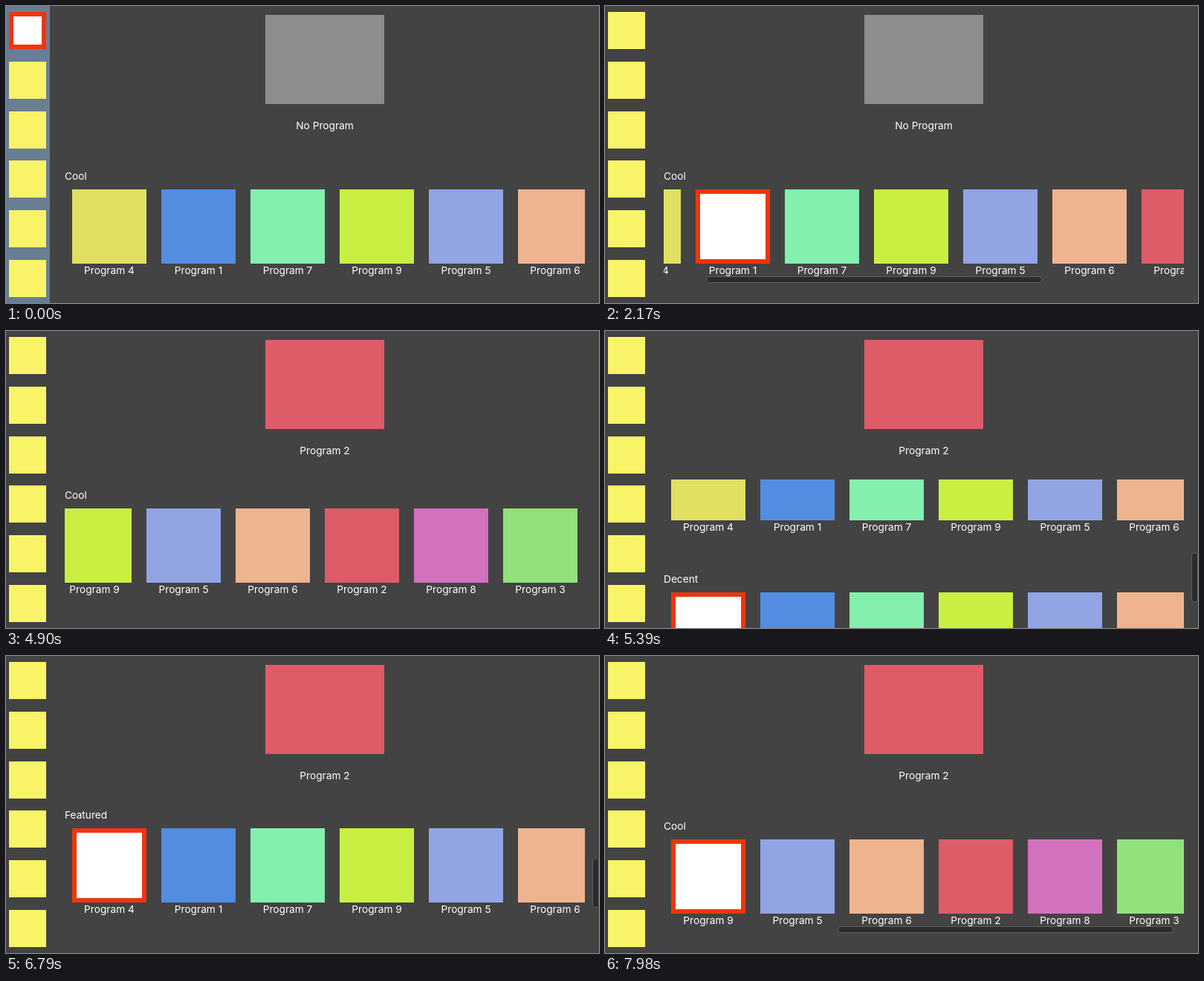
Write an HTML page with a canvas that moves like this. It is 798 by 400 pixels and loops after 8 s.

```html
<!DOCTYPE html>
<html lang="en">
<head>
<meta charset="utf-8">
<title>Program browser</title>
<style>
  html, body { margin: 0; width: 100%; height: 100%; overflow: hidden; background: #434343; }
  canvas { display: block; }
</style>
</head>
<body>
<canvas id="stage" width="798" height="400"></canvas>
<script>
const ctx = document.getElementById('stage').getContext('2d');
const LOOP = 8000, STEP = 70;

const BG = '#434343', RING = '#f0350e', YELLOW = '#f9f368';
const PROGRAMS = [
  [4, '#e1e063'], [1, '#528de2'], [7, '#83f0ae'],
  [9, '#c9ef42'], [5, '#91a5e4'], [6, '#eeb490'],
  [2, '#dd5c68'], [8, '#d271bd'], [3, '#92e17b']
].map(([id, color]) => ({ name: 'Program ' + id, color }));
const ROWS = ['Cool', 'Featured', 'Decent'];

const VIEW = { x: 79, y: 200, w: 700, h: 200 };
const PITCH = 120, ROW_H = 197;
const CONTENT_W = 1080, CONTENT_H = 588;
const MAX_X = CONTENT_W - VIEW.w, MAX_Y = CONTENT_H - VIEW.h;

// Focus moves: time, row (-1 is the menu), item.
const MENU = -1;
const MOVES = [
  [0, MENU, 0], [70, MENU, 1], [350, MENU, 2], [630, MENU, 3],
  [980, MENU, 2], [1260, MENU, 1],
  [1610, 0, 0], [1960, 0, 1], [2300, 0, 2], [2640, 0, 3], [2960, 0, 4],
  [3320, 0, 5], [3640, 0, 6],
  [4841, 1, 0], [5160, 2, 0], [5605, 2, 1], [5960, 2, 2],
  [6457, 1, 0], [6800, 0, 6], [7300, 0, 5], [7550, 0, 4], [7800, 0, 3]
].map(([at, row, item]) => ({ at, row, item }));
const SELECT = { at: 4200, program: PROGRAMS[6] };

// cubic-bezier(.42, 0, .58, 1)
function ease(x) {
  if (x <= 0) return 0;
  if (x >= 1) return 1;
  let lo = 0, hi = 1;
  for (let i = 0; i < 24; i++) {
    const u = (lo + hi) / 2, v = 1 - u;
    if (3 * v * v * u * 0.42 + 3 * v * u * u * 0.58 + u * u * u < x) lo = u;
    else hi = u;
  }
  return lo * lo * (3 - 2 * lo);
}

// Smooth scrolling: each new target starts from wherever the last one got to.
function makeScroll(moves, target, linger) {
  const runs = [];
  const valueOf = (run, t) => run.from + (run.to - run.from) * ease((t - run.at) / run.time);
  let to = 0;
  for (const move of moves) {
    const next = target(move);
    if (next === to) continue;
    const last = runs[runs.length - 1];
    const from = last ? valueOf(last, move.at) : 0;
    runs.push({ at: move.at, from, to: next, time: 30 * Math.sqrt(Math.abs(next - from)) });
    to = next;
  }
  return {
    at(t) {
      const run = runs.filter(r => r.at <= t).pop();
      return run ? valueOf(run, t) : 0;
    },
    barShown: t => runs.some(r => t > r.at + 65 && t < r.at + r.time + linger)
  };
}

const inRows = MOVES.filter(m => m.row !== MENU);
const scrollY = makeScroll(inRows, m => Math.min(m.row * ROW_H, MAX_Y), 40);
const scrollX = ROWS.map((_, row) =>
  makeScroll(inRows.filter(m => m.row === row), m => Math.min(m.item * PITCH, MAX_X), 300));

function rect(x, y, w, h, color) {
  ctx.fillStyle = color;
  ctx.fillRect(x, y, w, h);
}

function tile(x, y, size, color, focused) {
  rect(x, y, size, size, focused ? RING : color);
  if (focused) rect(x + 6, y + 6, size - 12, size - 12, '#fff');
}

function label(text, x, y, align = 'center') {
  ctx.font = '13.7px Inter, "Liberation Sans", sans-serif';
  ctx.textAlign = align;
  ctx.fillStyle = '#fff';
  ctx.fillText(text, x, y);
}

function bar(x, y, w, h) {
  ctx.beginPath();
  ctx.roundRect(x + 0.5, y + 0.5, w - 1, h - 1, 3.5);
  ctx.fillStyle = '#2b2b2b';
  ctx.fill();
  ctx.strokeStyle = '#606060';
  ctx.lineWidth = 1;
  ctx.stroke();
}

function clipped(x, y, w, h, paint) {
  ctx.save();
  ctx.beginPath();
  ctx.rect(x, y, w, h);
  ctx.clip();
  paint();
  ctx.restore();
}

function drawMenu(focus) {
  const active = focus.row === MENU;
  if (active) rect(0, 0, 59, 400, '#697e94');
  for (let i = 0; i < 6; i++) {
    tile(4, Math.round(8 + i * 66.8), 50, YELLOW, active && focus.item === i);
  }
}

function drawPreview(program) {
  rect(349, 12, 160, 120, program ? program.color : '#8d8d8d');
  label(program ? program.name : 'No Program', 429, 166);
}

function drawRow(row, t, focus, top) {
  const shift = Math.round(scrollX[row].at(t));
  label(ROWS[row], VIEW.x, top + 34, 'left');
  PROGRAMS.forEach((program, i) => {
    const x = 89 + i * PITCH - shift;
    tile(x, top + 47, 100, program.color, focus.row === row && focus.item === i);
    label(program.name, x + 50, top + 161);
  });
  if (scrollX[row].barShown(t)) {
    const ratio = VIEW.w / CONTENT_W;
    bar(VIEW.x + 1 + shift * ratio, top + 164, VIEW.w * ratio - 2, 9);
  }
}

function draw(t) {
  const focus = MOVES.filter(m => m.at <= t).pop();
  const y = Math.round(scrollY.at(t));

  rect(0, 0, 798, 400, BG);
  drawMenu(focus);
  drawPreview(t >= SELECT.at ? SELECT.program : null);

  clipped(VIEW.x, VIEW.y, VIEW.w, VIEW.h, () => {
    ROWS.forEach((_, row) => drawRow(row, t, focus, VIEW.y + row * ROW_H - y));
  });
  if (scrollY.barShown(t)) {
    const ratio = VIEW.h / CONTENT_H;
    bar(789, VIEW.y + y * ratio, 9, VIEW.h * ratio - 1);
  }
}

const start = performance.now();
function tick() {
  const t = Math.max(0, performance.now() - start) % LOOP;
  draw(Math.floor(t / STEP) * STEP);
  requestAnimationFrame(tick);
}
tick();
</script>
</body>
</html>
```
